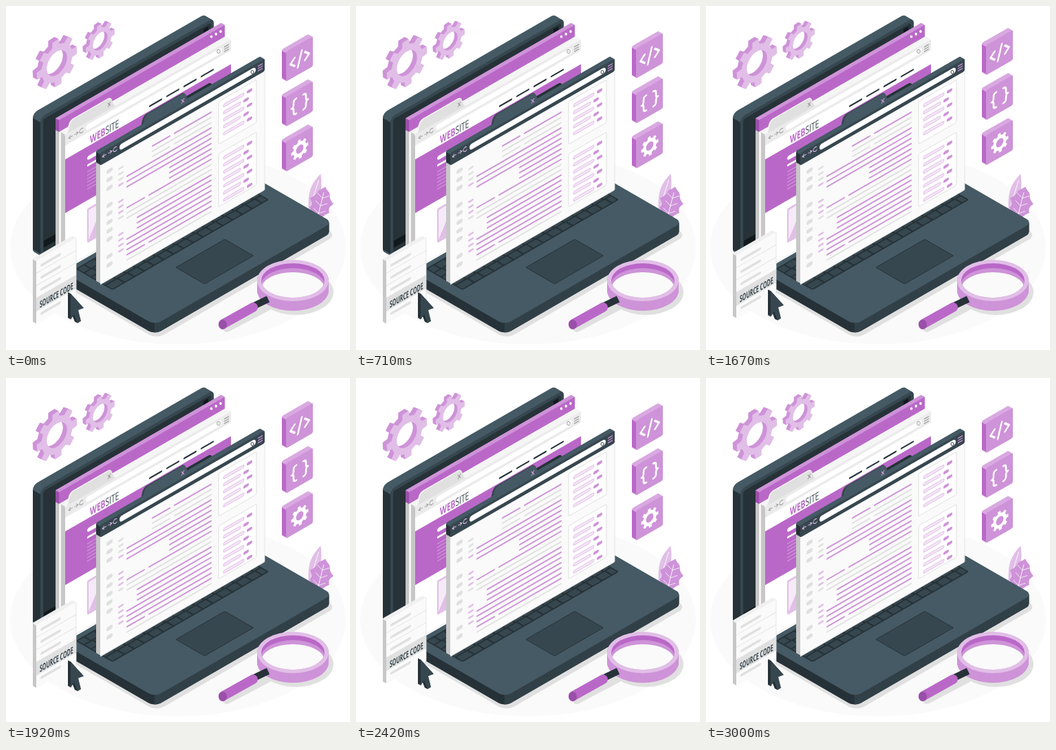
An HTML page with a canvas that plays this animation: 500 px wide and 500 px high, repeating every 3040 ms.

```html
<!DOCTYPE html>
<html lang="en">
<head>
<meta charset="utf-8">
<title>Source code</title>
<style>
html, body { margin: 0; width: 100%; height: 100%; overflow: hidden; background: #fff; }
canvas { display: block; width: 500px; height: 500px; }
</style>
</head>
<body>
<canvas id="stage" width="500" height="500"></canvas>
<script>
const LOOP = 3040, HALF = 1560, K = 0.575, TAU = Math.PI * 2;
const BLACK = '#11191d', INK = '#263238', SLATE = '#37474f', STEEL = '#455a64';
const PLUM = '#9a4fa8', PURPLE = '#ba68c8', LILAC = '#ce93d8', PALE = '#e1bee7';
const SHADE = '#c7c7c7', GREY = '#e0e0e0', MIST = '#ebebeb', PAPER = '#fafafa';

const stage = document.getElementById('stage').getContext('2d');
const still = document.createElement('canvas');
still.width = still.height = 500;
let c = still.getContext('2d');

function times(n, fn) {
  for (let i = 0; i < n; i++) fn(i);
}

function trace(p) {
  c.beginPath();
  for (let i = 0; i < p.length; i += 2) c.lineTo(p[i], p[i + 1]);
}

function poly(fill, ...p) {
  trace(p);
  c.fillStyle = fill;
  c.fill();
}

function stroke(color, width, ...p) {
  trace(p);
  c.strokeStyle = color;
  c.lineWidth = width;
  c.stroke();
}

function oval(fill, x, y, rx, ry) {
  c.beginPath();
  c.ellipse(x, y, rx, ry, 0, 0, TAU);
  c.fillStyle = fill;
  c.fill();
}

function ring(color, x, y, rx, ry) {
  c.beginPath();
  c.ellipse(x, y, rx, ry, 0, 0, TAU);
  c.strokeStyle = color;
  c.lineWidth = 1;
  c.stroke();
}

function box(fill, x, y, w, h, r = 0, line) {
  c.beginPath();
  c.roundRect(x, y, w, h, r);
  c.fillStyle = fill;
  c.fill();
  if (!line) return;
  c.strokeStyle = line;
  c.lineWidth = 1;
  c.stroke();
}

function within(matrix, draw) {
  c.save();
  c.transform(...matrix);
  draw();
  c.restore();
}

// Upright plane rising to the right, flat plane of the desk, and the gear plane.
const plane = (x, y, draw) => within([1, -K, 0, 1, x, y], draw);
const flat = (x, y, draw) => within([.866, -.5, .866, .5, x, y], draw);
const disc = (x, y, draw) => within([.866, -.5, 0, 1, x, y], draw);

// Upright panel with thickness d towards the upper left.
function slab(x, y, w, h, d, front, side, top, r = 0) {
  for (let i = d; i > 0; i -= .5)
    plane(x - i, y - i * K, () => box(top, 0, 0, w, h, r));
  poly(side, x - d, y - d * K + r, x, y + r, x, y + h - r, x - d, y + h - r - d * K);
  plane(x, y, () => box(front, 0, 0, w, h, r));
}

function tab(fill, x, w, h) {
  c.beginPath();
  c.moveTo(x, 1);
  c.bezierCurveTo(x + 9, 0, x + 3, -h, x + 14, -h);
  c.lineTo(x + w - 14, -h);
  c.bezierCurveTo(x + w - 5, -h, x + w - 9, 0, x + w, 1);
  c.fillStyle = fill;
  c.fill();
}

function text(str, x, y, font, fill, narrow) {
  let w;
  within([narrow, -narrow * K, 0, 1, x, y], () => {
    c.font = font + ' "Open Sans", "Noto Sans", sans-serif';
    c.fillStyle = fill;
    c.fillText(str, 0, 0);
    w = c.measureText(str).width * narrow;
  });
  return w;
}

function cog(fill, r, hole) {
  const step = TAU / 8, root = r * .77;
  c.beginPath();
  times(8, i => {
    for (const [rad, off] of [[root, -.29], [r, -.2], [r, .2], [root, .29]]) {
      const a = (i + off) * step - .07;
      c.lineTo(rad * Math.cos(a), rad * Math.sin(a));
    }
  });
  c.closePath();
  c.moveTo(hole, 0);
  c.arc(0, 0, hole, 0, TAU, true);
  c.fillStyle = fill;
  c.fill('evenodd');
}

function gear(x, y, r, depth) {
  for (let d = depth; d >= 0; d -= .5)
    disc(x - d, y - d / 2, () => cog(d ? LILAC : PALE, r, r * .5));
}

function leaf(fill, x, y, length, width, lean, lobes) {
  c.save();
  c.translate(x, y);
  c.rotate(lean);
  c.beginPath();
  for (let i = -40; i <= 40; i++) {
    const s = 1 - Math.abs(i) / 40;
    const lobe = 1 - .25 * Math.abs(Math.cos(lobes * Math.PI * s));
    c.lineTo(Math.sign(i) * width * lobe * Math.sin(Math.PI * s ** 1.2), -length * s);
  }
  c.fillStyle = fill;
  c.fill();
  stroke('#fff', .8, 0, 0, 0, -length * .85);
  for (let s = .3; lobes && s < .8; s += .2)
    stroke('#fff', .7, -width * .5, -length * (s + .1), 0, -length * s, width * .5, -length * (s + .1));
  c.restore();
}

function lid() {
  slab(50, 162, 252, 205, 11, SLATE, INK, STEEL, 7);
  plane(50, 162, () => {
    box(INK, 4, 5, 244, 193, 3);
    box(BLACK, 5, 182, 40, 10);
    box(BLACK, 237, 8, 7, 9);
  });
}

function laptop() {
  flat(82, 405, () => box(GREY, 0, 0, 302, 158, 12));
  for (let d = 14; d > 0; d -= .5) {
    for (const [x, fill] of [[0, INK], [216, SLATE]]) {
      c.save();
      c.beginPath();
      c.rect(x, 0, 500, 500);
      c.clip();
      flat(82, 386 + d, () => box(fill, 0, 0, 298, 155, 10));
      c.restore();
    }
  }
  flat(82, 386, () => box(STEEL, 0, 0, 298, 155, 10));
  flat(101, 382, () => {
    box(INK, 0, 0, 263, 62, 3);
    times(5, row => times(16, i => {
      const x = i ? i * 16.5 + row * 2 - 2 : 2;
      box(SLATE, x, 2 + row * 12, Math.min(i ? 14 : 10 + row * 2, 261 - x), 10, 1);
    }));
  });
  flat(247, 380, () => box(SLATE, 0, 0, 82, 48, 1, INK));
}

function arrows(x, y, color) {
  plane(x, y, () => {
    for (const [from, to] of [[6, 0], [8, 14]]) {
      const back = to + Math.sign(from - to) * 3;
      stroke(color, .9, from, 0, to, 0);
      stroke(color, .9, back, -2.5, to, 0, back, 2.5);
    }
    c.beginPath();
    c.arc(19, 0, 3, .6, 5.4);
    c.stroke();
  });
}

function cross(x, y, color) {
  plane(x, y, () => {
    for (const s of [-1, 1]) stroke(color, 1.1, -2, 3 * s, 2, -3 * s);
  });
}

function menu(x, y, color) {
  plane(x, y, () => times(3, i => box(color, 0, i * 3.4, 7, 1.4)));
}

function backWindow() {
  slab(77, 166, 241, 221, 5, '#f5f5f5', SHADE, LILAC);
  slab(77, 166, 241, 17, 5, PURPLE, PLUM, LILAC);
  times(3, i => oval('#fff', 298.5 + i * 6.7, 44.5 - i * 3.7, 1.8, 2.1));

  slab(86, 187, 241, 193, 6, '#fff', SHADE, '#f5f5f5');
  plane(86, 187, () => {
    tab('#f5f5f5', -2, 78, 17);
    tab(GREY, 0, 76, 15.5);
    box(MIST, 0, 0, 241, 16);
    box('#fff', 30, 4, 198, 8, 4);
    times(4, i => box(INK, 122 + i * 25, 28, 19, 2.4, 1));
    box(PURPLE, 0, 36, 241, 78);
    box('#fff', 32, 50, 40, 6, 3);
    box('#fff', 32, 62, 34, 3, 1);
    times(6, i => box(LILAC, 32, 72 + i * 5, 40, 1.3));
    box(PALE, 32, 126, 60, 50, 2);
    box('#f5eaf7', 34, 129, 56, 43, 1);
    poly(PALE, 34, 172, 45, 152, 56, 172);
  });
  arrows(91, 192, '#9e9e9e');
  cross(150, 143, '#9e9e9e');
  ring('#9e9e9e', 309, 66, 2.3, 2.8);
  menu(317, 59, '#9e9e9e');

  const w = text('WEB', 122, 200, 'bold 15.5px', PURPLE, .66);
  text('SITE', 122 + w, 200 - w * K, '15.5px', SLATE, .66);
}

function sideCard(y, h, count) {
  plane(309, y, () => {
    box('#fff', 0, 0, 55, h, 2, GREY);
    times(count, i => {
      const top = 8 + i * 10.2, inset = i % 2 * 5;
      box('#f3e5f5', 7, top, 30 - inset, 4.2, 2, PALE);
      box(LILAC, 41 - inset, top, 8, 4.4, 2);
    });
  });
}

// Lines end at one margin; every block of three shares an indent.
function code() {
  const indent = [37, 0, 62, 0, 15, 0, 0];
  times(20, i => {
    const grey = (i + 8) % 9 < 2;
    const from = 38 + indent[i / 3 | 0], y = 15 + i * 7.6;
    const split = i % 9 === 0 || i === 2 ? from + 32 : from;
    const bar = (a, b) => box(grey ? GREY : LILAC, a, y, b - a, 2.2, 1.1);
    if (split > from) bar(from, split - 5);
    bar(split, 162);
  });
  times(12, i => {
    if (i % 6 !== 3) box(GREY, 9, 13 + i * 12.4, 9, 6, 2.5);
  });
  times(18, i => {
    if (i % 6 < 4) box(i % 9 < 3 ? GREY : PALE, 26, 20 + i * 8, 8, 3, 1.5);
  });
}

function frontWindow() {
  slab(137, 214, 239, 191, 6, PAPER, SHADE, STEEL, 2);
  plane(137, 214, () => {
    tab(INK, 94, 76, 11);
    tab(SLATE, 54, 78, 19);
    tab(STEEL, 57, 76, 17.5);
  });
  slab(137, 214, 239, 18, 6, SLATE, INK, STEEL, 2);
  plane(137, 231, () => {
    box('#fff', 28, -13, 198, 8.5, 4);
    code();
  });
  stroke(GREY, .8, 376, 94, 376, 267, 137, 405);
  arrows(140, 219, PALE);
  cross(257, 138, LILAC);
  ring(SLATE, 358, 96, 2, 2.5);
  menu(366, 87, LILAC);
  sideCard(139, 62, 5);
  sideCard(215, 77, 7);
}

function magnifier() {
  c.lineCap = 'round';
  stroke(GREY, 12, 321, 468, 380, 437);
  oval(GREY, 421, 416, 55, 33);
  for (let d = 14; d >= 0; d -= .5) oval(d ? LILAC : PALE, 417, 399 + d, 52, 30);

  c.save();
  c.beginPath();
  c.ellipse(417, 399, 46, 25, 0, 0, TAU);
  c.clip();
  c.fillStyle = PURPLE;
  c.fillRect(360, 370, 115, 60);
  oval(LILAC, 417, 407, 47, 26);
  oval(PAPER, 417, 411, 46, 24);
  c.restore();

  c.lineCap = 'butt';
  stroke(INK, 10, 358, 437, 381, 426);
  c.lineCap = 'round';
  stroke(PURPLE, 14, 316, 462, 359, 438);
  c.lineCap = 'butt';
  oval(PLUM, 315, 463, 6, 7);
}

function tile(y, glyph) {
  slab(407, y + 25, 39, 43.5, 6, LILAC, PURPLE, '#d9a9e1', 2);
  plane(427, y + 35.5, () => {
    c.lineCap = c.lineJoin = 'round';
    glyph();
    c.lineCap = 'butt';
    c.lineJoin = 'miter';
  });
}

function mirrored(draw) {
  draw();
  c.scale(-1, 1);
  draw();
}

function tagGlyph() {
  stroke('#fff', 2.6, 3, -11, -3, 11);
  mirrored(() => stroke('#fff', 2.8, 7.5, -6, 13.5, 0, 7.5, 6));
}

function braceGlyph() {
  const brace = new Path2D('M5 -11Q9 -11 9 -7V-4Q9 0 12 0Q9 0 9 4V7Q9 11 5 11');
  c.strokeStyle = '#fff';
  c.lineWidth = 2.6;
  mirrored(() => c.stroke(brace));
}

function gearGlyph() {
  c.scale(.9, 1);
  cog('#fff', 14, 6);
}

function sheet() {
  slab(44, 370, 58, 92.5, 5, PAPER, SHADE, '#f0f0f0', 1);
  plane(44, 370, () => {
    box(GREY, 0, 54, 58, 20);
    times(2, i => box(GREY, 0, 18 + i * 18, 58, .9));
    times(5, i => { if (i !== 3) box(GREY, 6, 9 + i * 17.5, 30, 4, 2); });
  });
  stroke(GREY, .8, 102, 337, 102, 429);
  text('SOURCE CODE', 49, 439, 'bold 13.5px', SLATE, .52);
}

function cursor() {
  const arrow = fill => poly(fill, 0, 0, 19, 21, 11, 24, 15, 40, 10, 43, 5, 30, 0, 38);
  for (let d = 4; d >= 0; d -= .5)
    within([1, 0, 0, 1, 94 - d, 418 - d * .5], () => arrow(d ? INK : SLATE));
}

// Straight rise and fall that begins at the given time.
function lift(t, start, height) {
  const p = Math.max(0, t - start) / HALF;
  return height * Math.max(0, 1 - Math.abs(p - 1));
}

const raised = (dy, draw) => within([1, 0, 0, 1, 0, -dy], draw);

function paint(t) {
  c.clearRect(0, 0, 500, 500);
  c.drawImage(still, 0, 0);
  raised(lift(t, 0, 10), () =>
    [tagGlyph, braceGlyph, gearGlyph].forEach((g, i) => tile(41.5 + i * 65.5, g)));
  raised(lift(t, 1040, 20), sheet);
  raised(lift(t, 1040, 10), cursor);
}

oval(PAPER, 250, 351, 244, 141);
lid();
leaf(PALE, 439, 303, 62, 10, .3, 0);
leaf(LILAC, 450, 318, 57, 18, .25, 4);
laptop();
backWindow();
frontWindow();
magnifier();
gear(74, 83, 34, 6);
gear(137, 51, 24.5, 4.5);

c = stage;
const begin = performance.now();
function frame() {
  paint((performance.now() - begin) % LOOP);
  requestAnimationFrame(frame);
}
frame();
</script>
</body>
</html>
```
